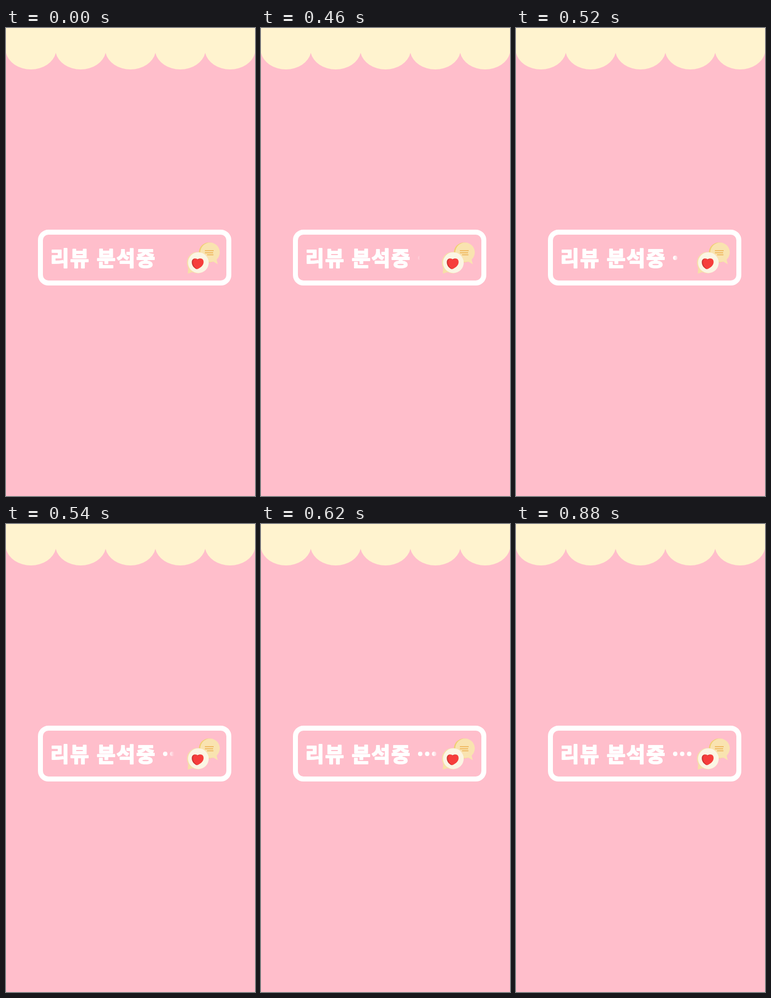
Recreate the animation shown at these times as an HTML page. Size 452x847 px, loop 1030 ms.

```html
<!DOCTYPE html>
<html lang="ko">
<head>
<meta charset="utf-8">
<style>
  html, body { margin: 0; width: 100%; height: 100%; overflow: hidden; background: #ffbecb; }
  svg { display: block; width: 100%; height: 100%; }
  text {
    font: 900 37px "Noto Sans CJK KR", "Noto Sans CJK", sans-serif;
    letter-spacing: 1.9px;
    fill: #fff; stroke: #fff; stroke-width: 2; stroke-linejoin: round;
  }
</style>
</head>
<body>
<svg viewBox="0 0 452 847">
  <defs>
    <linearGradient id="wipe" gradientUnits="userSpaceOnUse" x1="-5" x2="5" y1="0" y2="0">
      <stop offset="0" stop-color="#fff"/>
      <stop offset="1" stop-color="#fff" stop-opacity="0"/>
    </linearGradient>
    <path id="heart" d="M347.600 436.500C342.500 433.500 339.300 429.500 339.300 424C339.300 416.500 346.500 415.500 348.900 420C351.500 415.500 358.700 416.500 358.700 423.500C358.700 429.500 353.500 433.500 347.600 436.500Z"/>
  </defs>

  <path id="awning" fill="#fff3cf"/>
  <rect x="62.500" y="369.500" width="342" height="92" rx="14.500" fill="none" stroke="#fff" stroke-width="9"/>
  <text x="80.500" y="430.500">리뷰 분석중</text>

  <g fill="url(#wipe)">
    <circle cx="289" cy="416" r="4"/>
    <circle cx="301.700" cy="416" r="4"/>
    <circle cx="314.400" cy="416" r="4"/>
  </g>

  <!-- back bubble -->
  <circle cx="368.200" cy="406.300" r="18" fill="#f0cf70"/>
  <path d="M375 422L384.500 427.500L381.500 416Z" fill="#f9e3b0"/>
  <circle cx="370.400" cy="406" r="17.700" fill="#f9e3b0"/>
  <path d="M361 403H377M361 406.700H376M365 410.400H376.500" stroke="#edb04f" stroke-width="1.500"/>

  <!-- front bubble -->
  <path d="M331 432L330 444.500L341 441Z" fill="#f6e0a6"/>
  <circle cx="347.800" cy="424.700" r="19.300" fill="#f6e0a6"/>
  <circle cx="349.200" cy="424.700" r="18.800" fill="#fbf5e4"/>
  <use href="#heart" x="-2" fill="#c9302f"/>
  <use href="#heart" fill="#f63d3b"/>
</svg>
<script>
  const LOOP = 1030, START = 460, STEP = 40, LAST_STEP = 5;
  const FIRST_EDGE = 283.5, ADVANCE = 8.3;
  const wipe = document.getElementById("wipe");

  const scallop = "a46 37 0 0 1 -90.400 0";
  document.getElementById("awning").setAttribute("d", `M0 0H452V44.900${scallop.repeat(5)}Z`);

  // The soft edge uncovers the dots from left to right in even steps.
  function draw(now) {
    const step = Math.min(LAST_STEP, Math.floor((now % LOOP - START) / STEP));
    const edge = FIRST_EDGE + ADVANCE * step;
    wipe.setAttribute("gradientTransform", `translate(${edge} 0)`);
    requestAnimationFrame(draw);
  }
  draw(performance.now());
</script>
</body>
</html>
```
